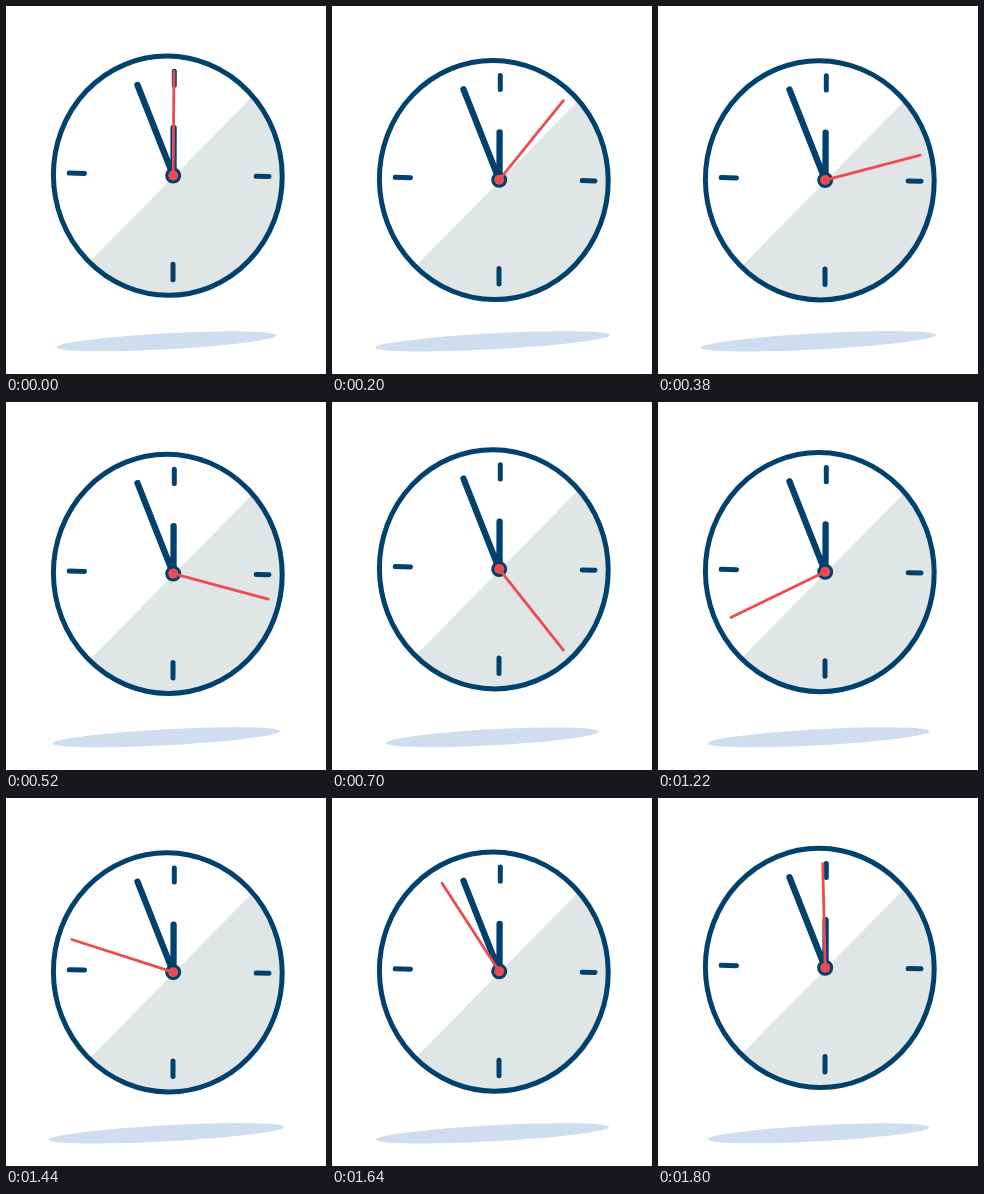
These frames come from a looping animation (320x368 px, 1.82 s). An HTML page:

```html
<!DOCTYPE html>
<html lang="en">
<head>
<meta charset="utf-8">
<title>Clock</title>
<style>
  html, body { margin: 0; width: 100%; height: 100%; overflow: hidden; background: #fff; }
  svg { display: block; width: 320px; height: 368px; }
  .line { fill: none; stroke: #00416e; stroke-width: 5; stroke-linecap: round; }
  .hand { stroke-width: 6.3; }
  .second { stroke: #ee4b50; stroke-width: 2.8; }
</style>
</head>
<body>
<svg viewBox="0 0 320 368">
  <defs>
    <ellipse id="dial" rx="114.4" ry="119.6" transform="matrix(1 .004 .004 1 161.8 169.7)"/>
    <clipPath id="face"><use href="#dial"/></clipPath>
  </defs>
  <ellipse id="shadow" rx="110.5" ry="8" fill="#cfdeee" transform="translate(160.5 335.3) rotate(-3.1)"/>
  <g id="clock">
    <path d="M285.5 50.5 L45.5 294.5 H300 V50Z" fill="#e0e6e6" clip-path="url(#face)"/>
    <use href="#dial" class="line"/>
    <path class="line" d="M168.3 65.2V79.3 M167 258.3V273.8 M63.2 167L78.5 167.4 M250.2 170.3L263 170.6"/>
    <path class="line hand" d="M131.5 79L167.2 169.5 M167.5 169.5L167.6 122"/>
    <circle cx="167.2" cy="169.5" r="8" fill="#00416e"/>
    <circle cx="167.2" cy="169.5" r="5" fill="#ee4b50"/>
    <path id="second" class="line second"/>
  </g>
</svg>
<script>
  const LOOP = 1820, STEP = 20, TURN = 1809, BOB = 1206;
  const PIVOT = { x: 167.2, y: 169.5 };
  const clock = document.getElementById('clock');
  const second = document.getElementById('second');
  const shadow = document.getElementById('shadow');
  const start = performance.now();

  // Point on the slightly tilted dial, clockwise from twelve
  function tip(angle) {
    const s = Math.sin(angle), c = Math.cos(angle);
    const x = s * (102 - 4.2 * s), y = -c * (105 - c) - 0.9 * s * s;
    return { x: PIVOT.x + x - 0.007 * y, y: PIVOT.y + y + 0.02 * x };
  }

  function draw(t) {
    const wave = Math.sin(2 * Math.PI * t / BOB);
    const end = tip(2 * Math.PI * t / TURN);
    clock.setAttribute('transform', `translate(0 ${5 * wave})`);
    shadow.setAttribute('rx', 110.5 + 8 * wave);
    second.setAttribute('d', `M${PIVOT.x} ${PIVOT.y}L${end.x} ${end.y}`);
  }

  function tick() {
    const t = Math.max(0, performance.now() - start) % LOOP;
    draw(Math.floor(t / STEP) * STEP);
    requestAnimationFrame(tick);
  }

  draw(0);
  requestAnimationFrame(tick);
</script>
</body>
</html>
```
